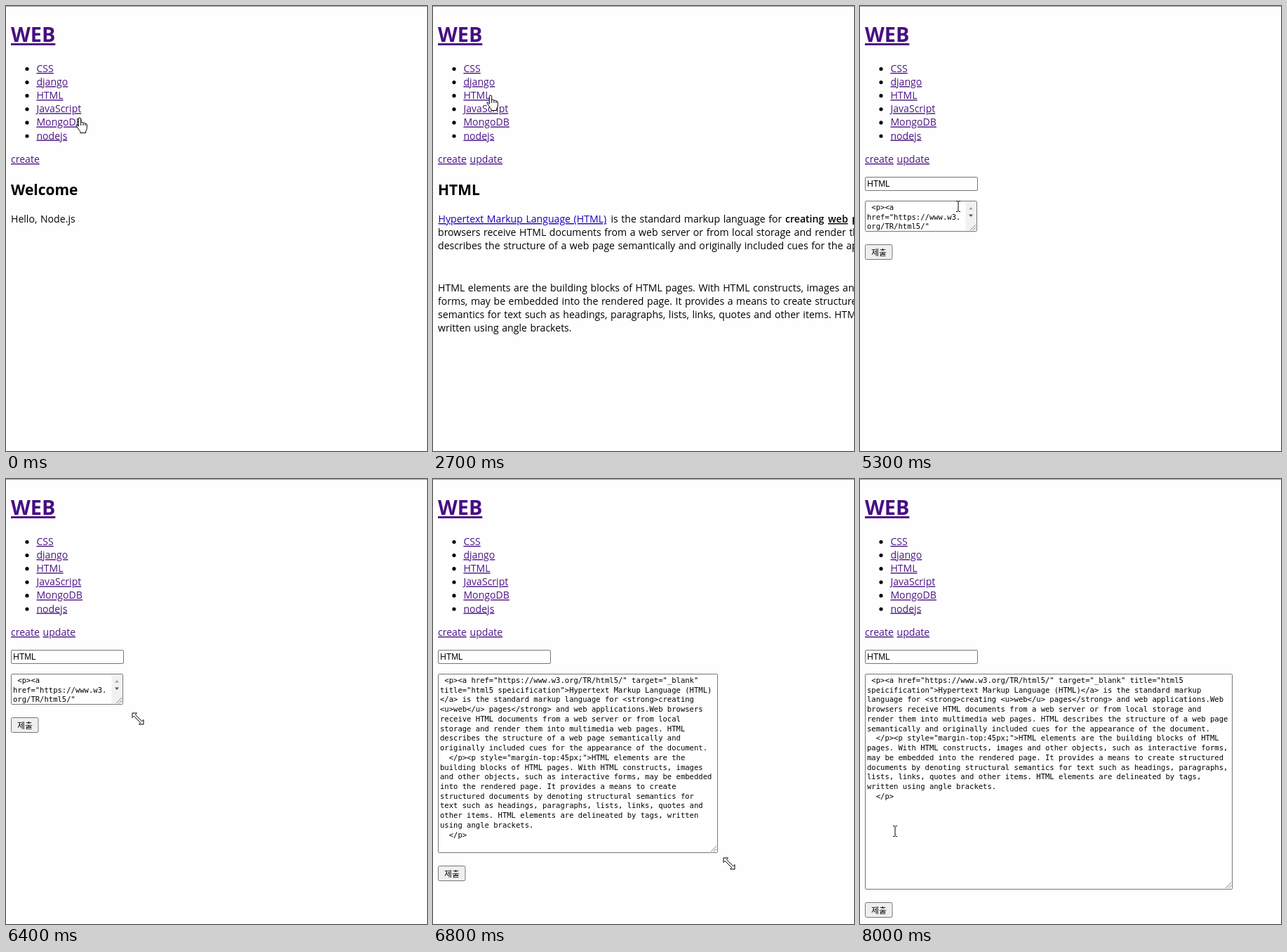
These frames come from a looping animation (600 px wide and 633 px high, 8100 ms). An HTML page:

```html
<!DOCTYPE html>
<html lang="en">
<head>
<meta charset="utf-8">
<title>WEB</title>
<style>
html, body { margin: 0; width: 100%; height: 100%; overflow: hidden; background: #fefefe; }
svg { display: block; width: 100%; height: 100%; }
text { font: 14.1px "Open Sans", "Noto Sans", sans-serif; word-spacing: 0.9px; white-space: pre; fill: #000; }
.link { fill: #4d1585; text-decoration: underline; }
.fresh { fill: #1600bc; text-decoration: underline; }
.h1 { font-size: 28.8px; font-weight: 700; fill: #470f82; }
.h2 { font-size: 21px; font-weight: 700; }
.bold { font-weight: 600; }
.under { text-decoration: underline; }
.field { font: 11.9px "Liberation Sans", Arial, sans-serif; }
.code { font: 10.565px "DejaVu Sans Mono", monospace; word-spacing: 0; }
.submit { font: 11.9px "Noto Sans CJK KR", "Noto Sans CJK JP", "Noto Sans CJK", sans-serif; text-anchor: middle; }
.box { fill: #fff; stroke: #767676; }
</style>
</head>
<body>
<svg id="stage" viewBox="0 0 600 633" xmlns="http://www.w3.org/2000/svg">
  <defs><clipPath id="clip"><rect id="clipBox" x="8" y="278"/></clipPath></defs>
  <rect width="600" height="633" fill="#fefefe"/>
  <rect width="600" height="1" fill="#999"/>
  <g id="menu"></g>
  <g id="welcome"></g>
  <g id="article"></g>
  <g id="form">
    <rect class="box" x="7.5" y="243.5" width="160" height="19" rx="1.5"/>
    <text class="field" x="10.3" y="257.3">HTML</text>
    <rect id="area" class="box" x="7.5" y="277.5" rx="1"/>
    <g id="lines" clip-path="url(#clip)"></g>
    <g id="bar">
      <rect id="track" y="278" width="15" fill="#f1f1f1"/>
      <path d="M4.5 289.5l3-3.5 3 3.5z" fill="#a3a3a3"/>
      <rect id="thumb" x="1.5" y="292" width="12" fill="#c1c1c1"/>
      <path id="down" d="M4.5 -2h6l-3 3.5z" fill="#505050"/>
    </g>
    <path id="grip" d="M-9.5 -1.5l8 -8M-5.5 -1.5l4 -4" stroke="#888" fill="none"/>
    <g id="button">
      <rect x="7.5" y="0.5" width="38.5" height="21" rx="2" fill="#efefef" stroke="#767676"/>
      <text class="submit" x="27" y="15.5">제출</text>
    </g>
  </g>
  <g id="cursor" fill="#fff" stroke="#000" stroke-width="1" stroke-linejoin="round">
    <path id="hand" d="M-1.7 1.5Q-1.7 0 0 0T1.7 1.5V7Q2 6 3.5 6.2Q5 6.4 5 7.8Q5.3 6.9 6.7 7.2Q8 7.5 8 8.8Q8.3 8 9.3 8.3Q10.3 8.7 10.3 10V14.5Q10.3 17 8.7 19V21.5H.8V19.5Q-1 17.5 -3 14Q-5.6 10.8 -5 10.1Q-4.1 9.2 -1.7 12ZM1.7 7V11M5 7.8V11M8 8.8V11"/>
    <path id="arrow" d="M0 0V15L3.5 11.8L5.9 17.2L8.2 16.2L5.8 11H10.6Z"/>
    <path id="beam" fill="none" d="M-3 -7.5H-1L0 -6.5L1 -7.5H3M-3 7.5H-1L0 6.5L1 7.5H3M0 -6.5V6.5"/>
    <path id="resize" d="M-8 -8H-1.5L-3.7 -5.8L5.8 3.7L8 1.5V8H1.5L3.7 5.8L-5.8 -3.7L-8 -1.5Z"/>
  </g>
</svg>
<script>
const LOOP = 8100, STEP = 100;
const PITCH = 6.36, LEADING = 13.73;
const $ = id => document.getElementById(id);

function put(group, x, y, str, cls = "") {
  const el = document.createElementNS("http://www.w3.org/2000/svg", "text");
  el.setAttribute("x", x);
  el.setAttribute("y", y);
  el.setAttribute("class", cls);
  el.textContent = str;
  $(group).append(el);
  return el;
}

function dot(y) {
  const el = document.createElementNS("http://www.w3.org/2000/svg", "circle");
  el.setAttribute("cx", 30);
  el.setAttribute("cy", y);
  el.setAttribute("r", 2.6);
  $("menu").append(el);
}

put("menu", 7, 51, "WEB", "link h1");
["CSS", "django", "HTML", "JavaScript", "MongoDB", "nodejs"].forEach((name, i) => {
  const y = 94 + i * 19.1;
  dot(y - 4.5);
  put("menu", 43.4, y, name, "link");
});
put("menu", 7, 223, "create", "link");
const update = put("menu", 52.5, 223, "update", "link");

put("welcome", 7, 269, "Welcome", "h2");
put("welcome", 7, 308, "Hello, Node.js");

put("article", 7, 269, "HTML", "h2");
put("article", 7.5, 308, "Hypertext Markup Language (HTML)", "fresh");
put("article", 253.5, 308, "is the standard markup language for");
put("article", 502, 308, "creating", "bold");
put("article", 563, 308, "web", "bold under");
put("article", 597, 308, "pages", "bold");
[
  [327, "browsers receive HTML documents from a web server or from local storage and render them into"],
  [346, "describes the structure of a web page semantically and originally included cues for the appearance"],
  [406, "HTML elements are the building blocks of HTML pages. With HTML constructs, images and other"],
  [425, "forms, may be embedded into the rendered page. It provides a means to create structured documents"],
  [444, "semantics for text such as headings, paragraphs, lists, links, quotes and other items. HTML elements"],
  [463, "written using angle brackets."]
].forEach(([y, str]) => put("article", 7, y, str));

const markup = ` <p><a href="https://www.w3.org/TR/html5/" target="_blank" title="html5 speicification">Hypertext Markup Language (HTML)</a> is the standard markup language for <strong>creating <u>web</u> pages</strong> and web applications.Web browsers receive HTML documents from a web server or from local storage and render them into multimedia web pages. HTML describes the structure of a web page semantically and originally included cues for the appearance of the document.
  </p><p style="margin-top:45px;">HTML elements are the building blocks of HTML pages. With HTML constructs, images and other objects, such as interactive forms, may be embedded into the rendered page. It provides a means to create structured documents by denoting structural semantics for text such as headings, paragraphs, lists, links, quotes and other items. HTML elements are delineated by tags, written using angle brackets.
  </p>`;

// Word wrap that splits words longer than a line.
function wrap(str, cols) {
  const out = [];
  for (const para of str.split("\n")) {
    let line = "";
    for (const word of para.split(/(?<=\))(?=<)|(?<= )(?=[^ ])/)) {
      if (line && (line + word).trimEnd().length > cols) {
        out.push(line);
        line = "";
      }
      line += word;
      while (line.trimEnd().length > cols) {
        out.push(line.slice(0, cols));
        line = line.slice(cols);
      }
    }
    out.push(line);
  }
  return out;
}

// Pointer path: time, x, y, shape
const path = [
  [0, 105, 159, "hand"], [300, 91, 146, "hand"], [400, 91, 146, "hand"],
  [900, 75, 122, "hand"], [1300, 82, 106, "hand"], [1700, 84, 119, "hand"],
  [2100, 82, 126, "hand"], [2600, 82, 126, "hand"], [2700, 82, 127, "hand"],
  [2900, 98, 160, "arrow"], [3300, 180, 290, "beam"], [3500, 213, 339, "beam"],
  [3700, 213, 339, "beam"], [3900, 170, 295, "arrow"], [4300, 94, 226, "hand"],
  [4400, 90, 221.5, "hand"], [4700, 90, 221.5, "hand"], [5000, 103, 238, "arrow"],
  [5300, 140, 285, "beam"], [5500, 162, 316, "resize"], [5600, 165, 320, "resize"],
  [6300, 172, 327, "resize"], [6400, 188, 341, "resize"], [6500, 271, 421, "resize"],
  [6600, 350, 485, "resize"], [6700, 411, 538, "resize"], [6800, 422, 547, "resize"],
  [7000, 465, 575, "resize"], [7200, 538, 600, "resize"], [7300, 536, 590, "resize"],
  [7500, 536, 590, "resize"], [7600, 450, 575, "beam"], [7800, 140, 525, "beam"],
  [8000, 50, 501, "beam"]
];

function pointer(t) {
  const i = path.findLastIndex(k => k[0] <= t);
  const a = path[i], b = path[i + 1] || a;
  const f = b === a ? 0 : (t - a[0]) / (b[0] - a[0]);
  return { x: a[1] + (b[1] - a[1]) * f, y: a[2] + (b[2] - a[2]) * f, shape: a[3] };
}

const show = (id, on) => $(id).setAttribute("display", on ? "inline" : "none");
const set = (id, attrs) => {
  for (const k in attrs) $(id).setAttribute(k, attrs[k]);
};

function drawArea(right, bottom) {
  const height = bottom - 278;
  const cols = bar => Math.floor((right - 13 - (bar ? 14 : 0)) / PITCH);
  let rows = wrap(markup, cols(false));
  const bar = rows.length * LEADING + 4 > height;
  if (bar) rows = wrap(markup, cols(true));

  set("area", { width: right - 7.5, height: bottom - 277.5 });
  set("clipBox", { width: right - 9, height: height - 1 });
  $("lines").replaceChildren();
  rows.slice(0, Math.ceil(height / LEADING)).forEach((row, i) =>
    put("lines", 10, 290 + i * LEADING, row, "code"));

  show("bar", bar);
  if (bar) {
    const room = Math.max(0, height - 43);
    set("bar", { transform: `translate(${right - 16} 0)` });
    set("track", { height: height - 1 });
    set("thumb", { height: room * Math.min(1, height / (rows.length * LEADING)) });
    set("down", { transform: `translate(0 ${bottom - 22})` });
  }
  set("grip", { transform: `translate(${right} ${bottom})` });
  set("button", { transform: `translate(0 ${Math.round(bottom + 18)})` });
}

function draw(t) {
  const page = t < 2000 ? "welcome" : t < 4500 ? "article" : "form";
  for (const id of ["welcome", "article", "form"]) show(id, id === page);
  update.setAttribute("display", page === "welcome" ? "none" : "inline");

  if (page === "form") {
    // The box corner trails the pointer by one step until it is released.
    const drag = pointer(Math.min(t - STEP, 7400));
    drawArea(Math.max(166, drag.x - 6) + 0.5, Math.max(320, drag.y - 7) + 0.5);
  }

  const p = pointer(t);
  for (const id of ["hand", "arrow", "beam", "resize"]) show(id, id === p.shape);
  set("cursor", { transform: `translate(${p.x} ${p.y})` });
}

let last = -1;
function tick() {
  const t = Math.floor((performance.now() % LOOP) / STEP) * STEP;
  if (t !== last) draw(last = t);
  requestAnimationFrame(tick);
}
tick();
</script>
</body>
</html>
```
